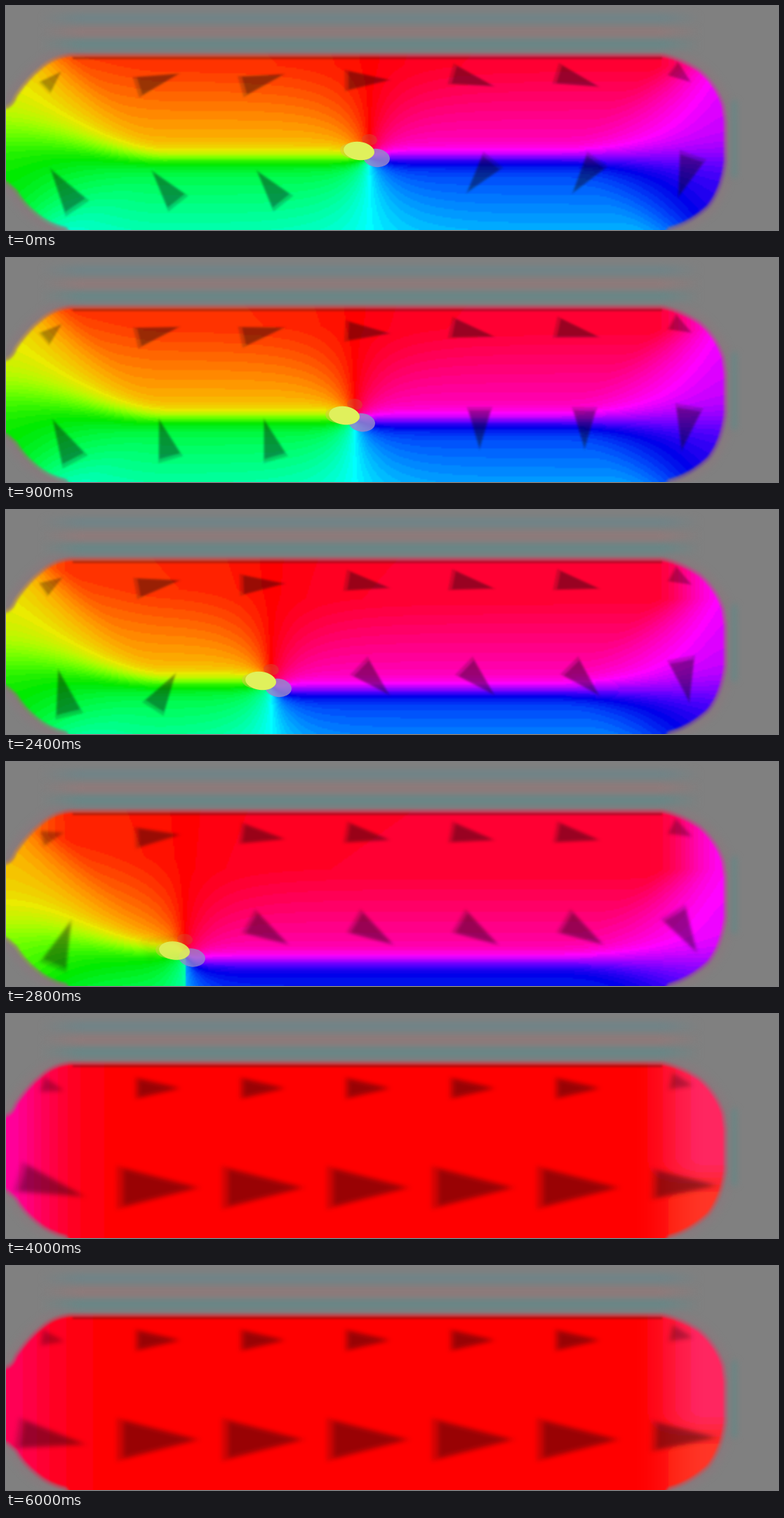
Recreate the animation shown at these times as an HTML page with a canvas. Size 1100 by 320 pixels, loop 6.1 s.

```html
<!DOCTYPE html>
<html lang="en">
<head>
<meta charset="utf-8">
<title>Vortex expulsion</title>
<style>
html, body { margin: 0; width: 1100px; height: 320px; overflow: hidden; background: #808080; }
canvas { display: block; }
</style>
</head>
<body>
<canvas id="stage" width="1100" height="320"></canvas>
<script>
const W = 1100, H = 320, LOOP = 6100, STEP = 100, CELL = 2, HUE_STEP = 4;
const ctx = document.getElementById('stage').getContext('2d');

function layer(w, h) {
  const c = document.createElement('canvas');
  c.width = w;
  c.height = h;
  return c.getContext('2d');
}
const field = layer(W / CELL, H / CELL);
const body = layer(W, H);
const back = layer(W, H);
const pixels = field.createImageData(W / CELL, H / CELL);

const clamp = (v, a = 0, b = 1) => Math.min(b, Math.max(a, v));
const mix = (a, b, k) => a + (b - a) * k;
const smooth = v => { v = clamp(v); return v * v * (3 - 2 * v); };

// Full colour wheel, a little darker at yellow, green and blue
const palette = Array.from({ length: 360 / HUE_STEP }, (_, i) => {
  const h = i * HUE_STEP;
  const dip = [60, 120, 240].reduce((sum, c) => sum + Math.exp(-(((h - c) / 14) ** 2)), 0);
  return [5, 3, 1].map(n => {
    const k = (n + h / 60) % 6;
    return 255 * (1 - 0.08 * dip) * (1 - clamp(Math.min(k, 4 - k)));
  });
});

// seconds, core x, core y, wall height left and right of the core
const path = [
  [0, 518, 211, 216, 216],
  [0.9, 497, 229, 227, 232],
  [1.6, 463, 239, 234, 244],
  [2.4, 378, 248, 244, 257],
  [2.7, 305, 262, 257, 271],
  [2.9, 205, 285, 278, 296],
  [3.05, 70, 322, 310, 340],
  [3.2, -160, 400, 390, 410]
];

function stateAt(t) {
  let i = 1;
  while (i < path.length - 1 && t > path[i][0]) i++;
  const a = path[i - 1], b = path[i], k = clamp((t - a[0]) / (b[0] - a[0]));
  const [, x, y, left, right] = a.map((v, n) => mix(v, b[n], k));
  return {
    x, y, left, right,
    settled: smooth((t - 2.7) / 0.5),
    tilt: 12 + 38 * Math.exp(-Math.max(0, t - 3.2) / 1.9)
  };
}

// Direction of the field in degrees: 0 right, 90 up
function angle(x, y, s) {
  let relaxed = 0, swirl = 0;
  if (s.settled > 0) {
    relaxed = -s.tilt * Math.exp(-Math.pow(Math.max(0, x) / 75, 1.7))
      + smooth((x - 890) / 110) * mix(-16, 4, smooth((y - 205) / 60));
  }
  if (s.settled < 1) {
    const dx = x - s.x;
    const bend = 1 - smooth(x / 230);
    const d = y - mix(s.left, s.right, smooth((dx + 20) / 40)) + 40 * bend;
    const depth = clamp(d / 130, -1, 1);
    // the ends turn the field upright, further in near the wall
    const span = mix(260, 110, Math.abs(depth));
    const leftEnd = 1 - smooth((x + 10) / span);
    const rightEnd = smooth((x - 1030 + span) / span);
    const wall = 13 + 22 * leftEnd + 14 * rightEnd;
    let v = 0.45 * Math.tanh(d / wall) + 0.42 * depth;
    const reach = 9 + Math.abs(d) * 0.45;
    v += (Math.tanh(d / 5) - v) * Math.exp(-Math.abs(dx) / reach);
    v *= 1 - 0.5 * leftEnd - 0.65 * rightEnd;
    swirl = dx < 0 ? 90 + 90 * v : -90 - 90 * v;
  }
  return mix(swirl, relaxed, s.settled);
}

function paintField(s) {
  const data = pixels.data;
  let p = 0;
  for (let y = 0; y < H; y += CELL) {
    for (let x = 0; x < W; x += CELL) {
      const i = Math.round(angle(x + 1, y + 1, s) / HUE_STEP) + palette.length;
      const pale = 0.15 * s.settled * smooth((x - 890) / 110);
      for (const c of palette[i % palette.length]) data[p++] = mix(c, 255, pale);
      data[p++] = 255;
    }
  }
  field.putImageData(pixels, 0, 0);
}

const outline = new Path2D(`M-30 150 L0 145 Q10 141 14 128 Q32 102 50 88
  Q68 72 92 70 L935 70 Q962 75 988 92 Q1012 112 1022 142 L1025 165 L1025 222
  Q1020 262 1001 286 Q975 310 945 318 L930 340 L100 340 L85 318
  Q60 312 44 298 Q24 282 14 264 L0 252 L-30 248 Z`);

function paintBack() {
  const band = (y, h, rgb) => {
    const g = back.createLinearGradient(50, 0, 990, 0);
    g.addColorStop(0, `rgba(${rgb},0)`);
    g.addColorStop(0.06, `rgb(${rgb})`);
    g.addColorStop(0.94, `rgb(${rgb})`);
    g.addColorStop(1, `rgba(${rgb},0)`);
    back.fillStyle = g;
    back.fillRect(50, y, 940, h);
  };
  back.fillStyle = '#808080';
  back.fillRect(0, 0, W, H);
  back.filter = 'blur(4px)';
  back.lineWidth = 24;
  back.strokeStyle = 'rgba(150,112,122,.28)';
  back.stroke(outline);
  band(46, 17, '106,134,134');
  band(30, 14, '142,122,122');
  band(11, 13, '112,131,135');
  back.fillStyle = '#648886';
  back.fillRect(1034, 135, 7, 110);
  back.filter = 'none';
}

function arrow(x, y, length, width, s, sampleY = y, strength = 1) {
  const shape = k => {
    body.beginPath();
    body.moveTo(length * 0.5 * k, 0);
    body.lineTo(-length * 0.5 * k, width * 0.5 * k);
    body.lineTo(-length * 0.5 * k, -width * 0.5 * k);
    body.fill();
  };
  body.save();
  body.translate(x, y);
  body.rotate(-angle(x, sampleY, s) * Math.PI / 180);
  body.globalAlpha = strength;
  body.filter = `blur(${mix(1.8, 3, s.settled)}px)`;
  body.fillStyle = 'rgba(20,20,20,.2)';
  shape(1.08);
  body.fillStyle = 'rgba(10,0,10,.27)';
  shape(0.9);
  body.restore();
}

function paintArrows(s) {
  const k = s.settled;
  for (let i = 0; i < 5; i++) {
    arrow(217 + 149.5 * i, 106, 62, 29, s);
    const x = mix(226, 218, k) + 149.6 * i;
    const y = mix(x < s.x ? 258 : 244, 248, k);
    const clear = Math.max(k, smooth((Math.abs(x - s.x) - 25) / 60));
    arrow(x, y, mix(58, 112, k), mix(34, 58, k), s, 232, clear);
  }
  arrow(67, 105, 32, 22, s, 105, 0.7);
  arrow(963, 99, 32, 24, s, 99, 0.7);
  arrow(mix(82, 66, k), mix(260, 247, k), mix(66, 96, k), mix(38, 42, k), s, 228);
  arrow(968, 244, mix(62, 90, k), mix(38, 42, k), s);
}

function blob(x, y, rx, ry, color) {
  body.fillStyle = color;
  body.beginPath();
  body.ellipse(x, y, rx, ry, 0.12, 0, Math.PI * 2);
  body.fill();
}

function paintCore(s) {
  body.globalAlpha = 1 - s.settled;
  blob(s.x, s.y - 20, 11, 8, 'rgba(215,70,45,.5)');
  blob(s.x - 24, s.y - 4, 18, 11, 'rgba(215,200,70,.5)');
  blob(s.x + 10, s.y + 6, 19, 13, 'rgba(148,134,205,.85)');
  blob(s.x - 15, s.y - 4, 22, 13, '#e0f05c');
  body.globalAlpha = 1;
}

function paint(t) {
  const s = stateAt(t);
  paintField(s);
  body.clearRect(0, 0, W, H);
  body.drawImage(field.canvas, 0, 0, W, H);
  paintArrows(s);
  paintCore(s);

  body.filter = 'blur(1.5px)';
  body.fillStyle = 'rgba(60,20,20,.35)';
  body.fillRect(95, 72, 840, 4);
  body.filter = 'blur(2.5px)';
  body.globalCompositeOperation = 'destination-in';
  body.fillStyle = '#000';
  body.fill(outline);
  body.globalCompositeOperation = 'source-over';
  body.filter = 'blur(1.5px)';
  body.strokeStyle = 'rgba(160,105,120,.4)';
  body.lineWidth = 5;
  body.stroke(outline);
  body.filter = 'none';

  ctx.drawImage(back.canvas, 0, 0);
  ctx.drawImage(body.canvas, 0, 0);
}

const start = performance.now();
let shown = -1;
function tick() {
  const step = Math.floor((performance.now() - start) % LOOP / STEP);
  if (step !== shown) {
    shown = step;
    paint(step * STEP / 1000);
  }
  requestAnimationFrame(tick);
}
paintBack();
tick();
</script>
</body>
</html>
```
